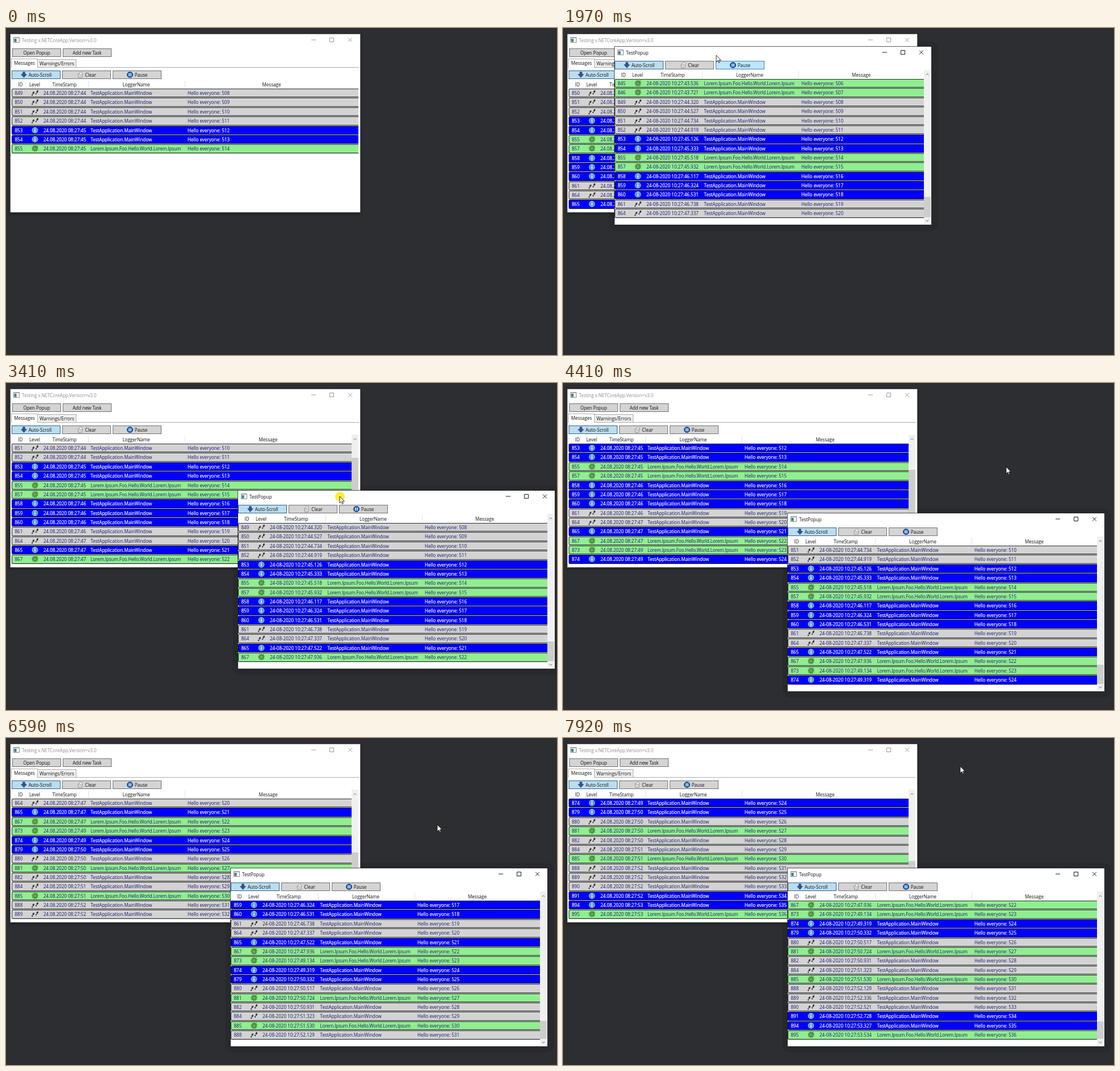
Write an HTML page that moves like this. It is 971x577 px and loops after 8000 ms.

```html
<!DOCTYPE html>
<html lang="en">
<head>
<meta charset="utf-8">
<title>Log viewer</title>
<style>
  html, body { margin: 0; width: 100%; height: 100%; overflow: hidden; background: #2d2e31; }
  body { position: relative; font: 8.05px/13px "Open Sans", "Noto Sans", sans-serif; color: #111; white-space: nowrap; }
  div, svg { box-sizing: border-box; position: absolute; }
  .win { background: #fff; height: 314px; }
  #main { left: 8px; top: 11px; width: 616px; box-shadow: 0 0 0 .7px #777, 0 2px 4px 2px rgba(0,0,0,.25); }
  #popup { width: 558px; box-shadow: 0 0 0 1px rgba(35,36,38,.75); }
  #shade { width: 579px; height: 334px; border-radius: 13px; background: #28292c; }
  .title { left: 20px; top: 3.5px; }
  .app { left: 5px; top: 5px; width: 11px; height: 10px; }
  .caption { right: 12px; top: 5px; width: 76px; height: 10px; fill: none; stroke: #000; stroke-width: .9; }
  #main .title { color: #8c8c8c; }
  #main .caption { stroke: #8c8c8c; }
  .btn { display: flex; align-items: center; justify-content: center; gap: 3px; width: 86px; height: 15px;
         background: #d4d4d4; border: 1px solid #707070; }
  .btn svg { position: static; width: 11px; height: 11px; }
  .on { background: #bcddee; border-color: #2c628b; }
  .hover { background: #bee6fd; border-color: #3c7fb1; }
  .tab { height: 15px; border: 1px solid #acacac; text-align: center; background: #f0f0f0; }
  .list { overflow: hidden; }
  .head { top: 1.5px; transform: translateX(-50%); }
  .sep { top: 2px; width: 1px; height: 13px; background: #e2e2e2; }
  .row { left: 0; border: 1px solid rgba(0,0,0,.78); border-right: 0; border-radius: 2px 0 0 2px; box-shadow: 0 1px #ccc; }
  .row div { top: 0; }
  .row svg { left: 33px; top: 0; width: 14px; height: 13px; }
  .t { background: #d3d3d3; color: #191970; }
  .d { background: #90ee90; color: #191970; }
  .i { background: #00f; color: #fff; -webkit-text-stroke: .2px #fff; }
  .d .logger { letter-spacing: -.1px; }
  .bar { right: 0; top: 0; width: 12px; height: 100%; background: #f0f0f0; }
  .thumb { left: 0; width: 12px; background: #cdcdcd; }
  .chev { left: 3px; width: 6px; height: 4px; fill: none; stroke: #666; }
  #glow { width: 17px; height: 17px; margin: -8.5px; border-radius: 50%; background: rgba(250,235,20,.85); }
  #cursor { width: 11px; height: 16px; overflow: visible; }
</style>
</head>
<body>
<svg width="0" height="0">
  <symbol id="app" viewBox="0 0 11 10">
    <path d="M.5 .5h10v9H.5z" fill="#f4f6f7" stroke="#8a8f93"/>
    <path d="M1 1h9v1.2H1z" fill="#b9c3c9"/><path d="M1.5 3h4v5.5h-4z" fill="#357f86"/>
  </symbol>
  <symbol id="arrow" viewBox="0 0 11 11">
    <path d="M3.7 .8h3.6v4h3L5.5 10.3 .7 4.8h3z" fill="#2f5597" stroke="#1d3767" stroke-width=".8"/>
  </symbol>
  <symbol id="clear" viewBox="0 0 11 11">
    <path d="M2 4h7.5l-.8 6.3H2.6z" fill="#e9e9e9" stroke="#777" stroke-width=".8"/>
    <path d="M4 3.5 5 .8l4.6 1-.5 2.4" fill="#fff" stroke="#888" stroke-width=".8"/>
    <path d="M4 6h3.5M4.2 8h3" stroke="#999" stroke-width=".7"/>
  </symbol>
  <symbol id="pause" viewBox="0 0 11 11">
    <circle cx="5.5" cy="5.5" r="5" fill="#1458b0" stroke="#0a3674" stroke-width=".8"/>
    <path d="M3.2 2.8h1.6v5.4H3.2zM6.2 2.8h1.6v5.4H6.2z" fill="#fff"/>
  </symbol>
  <symbol id="t" viewBox="-7 -6.5 14 13">
    <g id="foot" fill="#333"><ellipse cx="-2.7" cy="0" rx="1.5" ry="2.3" transform="rotate(32 -2.7 0)"/>
      <ellipse cx="-4.9" cy="3.7" rx="1.1" ry="1.3"/></g>
    <use href="#foot" x="7" y="-2.2"/>
  </symbol>
  <symbol id="i" viewBox="-7 -6.5 14 13">
    <circle r="5" fill="#5a9dc4" stroke="#a9cfe2" stroke-width=".9"/>
    <path d="M0 -1v3.8M0 -3.2v1.3" stroke="#fff" stroke-width="1.5"/>
  </symbol>
  <symbol id="d" viewBox="-7 -6.5 14 13">
    <path d="M-6 -2 -3 -2.6-4 -5.4-1.4 -3.8 0 -6.2 1.4 -4 5 -5.6 3.8 -2.4 6.5 -1.4 4 .5 6 3 3 2.9 3 5.8 .6 4-1 6.2-2 3.6-5 4.6-3.8 1.6-6.4 .6-4 -.6z" fill="#468a3f"/>
    <circle r="2.6" fill="#6fa85c"/>
  </symbol>
</svg>

<div id="shade"></div>
<div id="main" class="win"><div class="title">Testing v.NETCoreApp,Version=v3.0</div></div>
<div id="popup" class="win"><div class="title">TestPopup</div></div>
<div id="glow"></div>
<svg id="cursor"><path d="M0 0V12L2.8 9.4 4.6 13.4 6.4 12.6 4.6 8.8H8.4Z" fill="#fff" stroke="#000" stroke-width=".8"/></svg>

<script>
const LOOP = 8000, STEP = 110, PITCH = 16.36, LAG = 112, FIRST_MSG = 500;
const $ = id => document.getElementById(id);

// One letter per logger tick: trace, info, debug; a dot is an entry for the other tab.
const FIRST_ID = 839;
const ticks = 'tidttidd..ttttiid.diiit..ti.d.....di....itdt.td..ttti..id';
const log = [...ticks].map((level, k) => {
  const id = FIRST_ID + k;
  const stamp = (42.317 + 0.2 * k + id * 7 % 22 / 1000).toFixed(3);
  return { id, level, stamp, at: 196.8 * (id - 865) + 1864 };
}).filter(e => e.level !== '.');

// Key points: time, x, y
const windowPath = [[100,366,470],[840,11,21],[1200,16,20],[1640,91,33],[2410,91,33],[2850,407,140],
  [3290,410,187],[3950,396,230]];
const pointerPath = [[1640,270,45],[1860,280,58],[1970,270,48],[2410,270,43],[3950,575,240],[4060,679,152],
  [4390,781,148],[6370,781,148],[6590,760,153],[7570,758,156],[7910,700,50]];

function along(path, t) {
  const k = path.findIndex(p => p[0] > t);
  if (k < 1) return path.at(k).slice(1);
  const a = path[k - 1], b = path[k], f = (t - a[0]) / (b[0] - a[0]), ease = f * f * (3 - 2 * f);
  return [1, 2].map(j => Math.round(a[j] + (b[j] - a[j]) * ease));
}

function add(parent, cls, style = {}, html = '') {
  const el = document.createElement('div');
  el.className = cls;
  for (const k in style) el.style[k] = typeof style[k] === 'number' ? style[k] + 'px' : style[k];
  el.innerHTML = html;
  parent.append(el);
  return el;
}
const icon = (name, cls = '') => `<svg class="${cls}"><use href="#${name}"/></svg>`;
const button = (win, left, top, label, pic, cls = '') =>
  add(win, 'btn ' + cls, { left, top }, (pic ? icon(pic) : '') + `<span>${label}</span>`);

function frame(win, x, top) {
  win.insertAdjacentHTML('beforeend', icon('app', 'app') +
    '<svg class="caption"><path d="M2 5h8M34.5 1.5h7v7h-7zM67 1.5l7 7M74 1.5l-7 7"/></svg>');
  button(win, x, top, 'Auto-Scroll', 'arrow', 'on');
  button(win, x + 89, top, 'Clear', 'clear');
  return button(win, x + 178, top, 'Pause', 'pause');
}

function makeList(win, o) {
  const box = add(win, 'list', { left: o.left, top: o.top, width: o.width, height: o.height });
  const head = (x, text) => add(box, 'head', { left: x }, text);
  head(15.5, 'ID');
  head(40.5, 'Level');
  head((56 + o.logger) / 2 - 4.5, 'TimeStamp');
  head(o.logger + 80.5, 'LoggerName');
  const message = head(0, 'Message');
  for (const x of [o.logger - 4, o.message - 5]) add(box, 'sep', { left: x });
  const rows = log.map((e, n) => {
    const row = add(box, 'row ' + e.level, {}, icon(e.level));
    const cell = (x, text, cls = '') => add(row, cls, { left: x - 1 }, text);
    cell(5.5, e.id);
    cell(56, o.time(e.stamp));
    cell(o.logger, e.level === 'd' ? 'Lorem.Ipsum.Foo.Hello.World.Lorem.Ipsum' : 'TestApplication.MainWindow', 'logger');
    cell(o.message, 'Hello everyone: ' + (FIRST_MSG + n));
    return row;
  });
  const bar = add(box, 'bar');
  const thumb = add(bar, 'thumb');
  const chev = (y, d) => bar.insertAdjacentHTML('beforeend',
    `<svg class="chev" style="top:${y}px"><path d="${d}"/></svg>`);
  chev(6, 'M.5 3.3 3 .8 5.5 3.3');
  chev(o.end + 4, 'M.5 .7 3 3.2 5.5 .7');

  const slot = k => Math.round(16.1 + k * PITCH);
  let shown = -1;
  return count => {
    if (count === shown) return;
    shown = count;
    const total = count - o.start, scroll = total > o.fit;
    const first = Math.max(o.start, count - o.fit), width = o.width - (scroll ? 12 : 0);
    rows.forEach((row, n) => {
      const k = n - first, on = k >= 0 && n < count;
      row.style.display = on ? '' : 'none';
      row.style.top = slot(k) + 'px';
      row.style.height = slot(k + 1) - slot(k) - 1 + 'px';
      row.style.width = width + 'px';
    });
    message.style.left = (o.message - 5 + width) / 2 + 'px';
    bar.style.display = scroll ? '' : 'none';
    const size = (o.end - 14) * o.fit / (total + o.older);
    thumb.style.top = o.end - size + 'px';
    thumb.style.height = size + 'px';
  };
}

const main = $('main'), popup = $('popup'), glow = $('glow'), cursor = $('cursor'), shade = $('shade');
button(main, 3, 25, 'Open Popup');
button(main, 92, 25, 'Add new Task');
add(main, '', { left: 1, top: 58, width: 613, height: 1, background: '#acacac' });
add(main, 'tab', { left: 47, top: 44, width: 69 }, 'Warnings/Errors');
add(main, 'tab', { left: 1, top: 43, width: 47, height: 16, background: '#fff', borderBottom: '0' }, 'Messages');
frame(main, 2, 64);
const pause = frame(popup, 0, 25);

// start: first entry listed; older: entries above the oldest one kept here
const showMain = makeList(main, { left: 2, top: 80, width: 611, height: 231, end: 217, logger: 139, message: 310,
  fit: 13, start: 8, older: 0, time: s => '24.08.2020 08:27:' + s.slice(0, 2) });
const showPopup = makeList(popup, { left: 0, top: 41, width: 557, height: 272, end: 260, logger: 157.5, message: 329,
  fit: 15, start: 0, older: 82, time: s => '24-08-2020 10:27:' + s });

const place = (el, x, y) => { el.style.left = x + 'px'; el.style.top = y + 'px'; };
const show = (el, on) => { el.style.visibility = on ? 'visible' : 'hidden'; };
const countAt = t => log.filter(e => e.at <= t).length;

function draw(t) {
  showMain(countAt(t));
  showPopup(countAt(t - LAG));

  // Movement is seen in steps, not continuously.
  const q = 100 + Math.floor((t - 100) / STEP) * STEP;
  const open = t >= 100;
  const drag = open && (q < 1640 || (q > 2410 && q <= 3950));
  const [x, y] = along(windowPath, q);
  const [px, py] = drag ? [x + 179, y + 10] : along(pointerPath, q);
  place(popup, x, y);
  place(shade, x - 9, y - 9);
  place(cursor, px, py);
  place(glow, px, py);
  for (const el of [popup, shade, cursor]) show(el, open);
  show(glow, drag);
  pause.classList.toggle('hover', q > 1640 && q <= 2410);
}

function tick() {
  draw(performance.now() % LOOP);
  requestAnimationFrame(tick);
}
tick();
</script>
</body>
</html>
```
